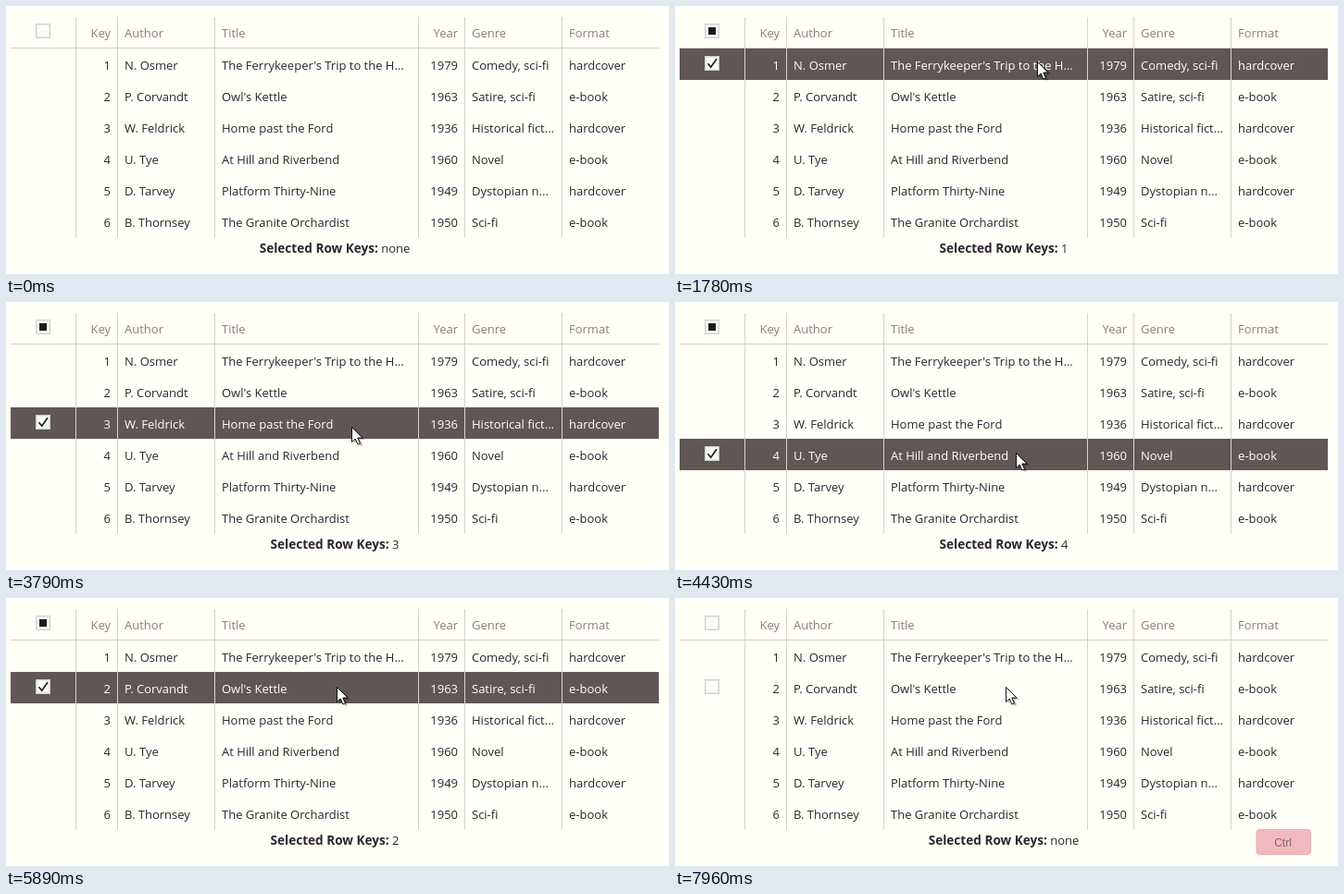
These frames come from a looping animation (716x290 px, 7990 ms). An HTML page:

```html
<!DOCTYPE html>
<html lang="en">
<head>
<meta charset="utf-8">
<title>Row selection</title>
<style>
  html, body { margin: 0; width: 100%; height: 100%; overflow: hidden; background: #fffff7; }
  svg { display: block; width: 716px; height: 290px; }
  text { font: 13px "Open Sans", "Noto Sans", sans-serif; fill: #2b2630; white-space: pre; }
  .head text { fill: #8d7d7c; }
  .on text { fill: #fff; }
  .bold { font-size: 13.6px; font-weight: 700; }
  .ctrl text { font: 12px "Liberation Sans", Arial, sans-serif; fill: #806a6c; }
  .grid { fill: #d3d4cd; }
</style>
</head>
<body>
<svg id="stage" viewBox="0 0 716 290" xmlns="http://www.w3.org/2000/svg"></svg>
<script>
const LOOP = 7990, STEP = 30, ROW_H = 34, TOP = 46;

const columns = [
  { x: 113, end: true }, { x: 128 }, { x: 233 },
  { x: 488, end: true }, { x: 503 }, { x: 608 }
];
const titles = ["Key", "Author", "Title", "Year", "Genre", "Format"];
const books = [
  ["1", "N. Osmer", "The Ferrykeeper's Trip to the H...", "1979", "Comedy, sci-fi", "hardcover"],
  ["2", "P. Corvandt", "Owl's Kettle", "1963", "Satire, sci-fi", "e-book"],
  ["3", "W. Feldrick", "Home past the Ford", "1936", "Historical fict...", "hardcover"],
  ["4", "U. Tye", "At Hill and Riverbend", "1960", "Novel", "e-book"],
  ["5", "D. Tarvey", "Platform Thirty-Nine", "1949", "Dystopian n...", "hardcover"],
  ["6", "B. Thornsey", "The Granite Orchardist", "1950", "Sci-fi", "e-book"]
];

// time, hovered row, selected row
const states = [
  [0, 0, 0], [590, 2, 0], [680, 1, 0], [1780, 1, 1],
  [2600, 2, 1], [2810, 3, 1], [3190, 3, 3],
  [4140, 4, 3], [4430, 4, 4],
  [5370, 3, 4], [5640, 2, 4], [5890, 2, 2], [7960, 2, 0]
];

// start time, number of steps, x and y reached
const entry = [722, 83];
const moves = [
  [560, 14, 391, 60], [2010, 1, 390, 62], [2480, 11, 378, 115],
  [2810, 4, 373, 129], [3060, 1, 373, 130], [3790, 1, 373, 135],
  [3990, 9, 368, 163], [4930, 1, 365, 160], [5090, 1, 365, 155],
  [5250, 4, 364, 141], [5370, 14, 357, 96]
];
const ctrlStart = 7690, ctrlSteps = 10;

const stage = document.getElementById("stage");

function add(parent, tag, attrs = {}, text) {
  const el = document.createElementNS("http://www.w3.org/2000/svg", tag);
  for (const key in attrs) el.setAttribute(key, attrs[key]);
  if (text !== undefined) el.textContent = text;
  parent.appendChild(el);
  return el;
}

function addCells(parent, cells, y) {
  cells.forEach((cell, i) => add(parent, "text", {
    x: columns[i].x, y, "text-anchor": columns[i].end ? "end" : "start"
  }, cell));
}

function addCheckbox(parent, y) {
  const g = add(parent, "g", { transform: `translate(32 ${y})` });
  add(g, "rect", { width: 16, height: 16, fill: "#cdd3ce" });
  add(g, "rect", { x: 1, y: 1, width: 14, height: 14, fill: "#e6ebe6" });
  add(g, "rect", { x: 2, y: 2, width: 12, height: 12, fill: "#fafcf8" });
  return g;
}

const show = (el, on) => el.setAttribute("visibility", on ? "visible" : "hidden");

const head = add(stage, "g", { class: "head" });
addCells(head, titles, 34);
const partial = add(addCheckbox(head, 19), "rect", { x: 4, y: 4, width: 8, height: 8, fill: "#1e1a1c" });

const rows = books.map((cells, i) => {
  const y = TOP + i * ROW_H;
  const group = add(stage, "g");
  const back = add(group, "rect", { x: 5, y, width: 700, height: ROW_H, fill: "#5f5655" });
  addCells(group, cells, y + 23);
  const box = addCheckbox(group, y + 8);
  const tick = add(box, "path", {
    d: "M3.5 8.2L6.7 12.2L13 3.2", fill: "none", stroke: "#1e1a1c", "stroke-width": 1.7
  });
  return { group, back, box, tick };
});

add(stage, "rect", { class: "grid", x: 5, y: 45, width: 700, height: 1 });
for (const x of [75, 120, 225, 445, 495, 600])
  add(stage, "rect", { class: "grid", x, y: 12, width: 1, height: 239 });

const summary = add(stage, "text", { x: 355, y: 267, "text-anchor": "middle" });
add(summary, "tspan", { class: "bold" }, "Selected Row Keys:");
const keys = add(summary, "tspan", {}, " none");

const ctrl = add(stage, "g", { class: "ctrl" });
add(ctrl, "rect", { x: 628, y: 250.5, width: 58.5, height: 27, rx: 3, fill: "#f2babf", stroke: "#e8b0b5" });
add(ctrl, "text", { x: 656.5, y: 269, "text-anchor": "middle" }, "Ctrl");

const cursor = add(stage, "g");
const arrow = "M.5 .5V16.5L4.2 13L6.8 19L9.4 17.9L6.8 12H12Z";
add(cursor, "path", { d: arrow, transform: "translate(3 2)", fill: "#000", opacity: .16 });
add(cursor, "path", { d: arrow, transform: "translate(2 1.5)", fill: "#000", opacity: .2 });
add(cursor, "path", { d: arrow, fill: "#fff", stroke: "#111", "stroke-width": 1 });

// share of a stepped move done; the first step lands at its start
const stepped = (t, start, n) =>
  t < start ? 0 : Math.min(1, (Math.floor((t - start) / STEP) + 1) / n);

function cursorAt(t) {
  let [x, y] = entry;
  for (const [start, n, toX, toY] of moves) {
    if (t < start) break;
    let k = stepped(t, start, n);
    if (start === 560) k = 1 - (1 - k) ** 1.7;
    x += (toX - x) * k;
    y += (toY - y) * k;
  }
  return [Math.round(x), Math.round(y)];
}

let current = null;
function setState(state) {
  if (state === current) return;
  current = state;
  const [, hover, selected] = state;
  rows.forEach((row, i) => {
    const on = selected === i + 1;
    row.group.setAttribute("class", on ? "on" : "");
    show(row.back, on);
    show(row.box, on || hover === i + 1);
    show(row.tick, on);
  });
  show(partial, selected > 0);
  keys.textContent = " " + (selected || "none");
}

function render(t) {
  setState(states.filter(s => s[0] <= t).pop());
  show(cursor, t >= moves[0][0]);
  cursor.setAttribute("transform", `translate(${cursorAt(t)})`);
  ctrl.setAttribute("opacity", stepped(t, ctrlStart, ctrlSteps));
}

const begin = performance.now();
function tick() {
  render((performance.now() - begin) % LOOP);
  requestAnimationFrame(tick);
}
tick();
</script>
</body>
</html>
```
